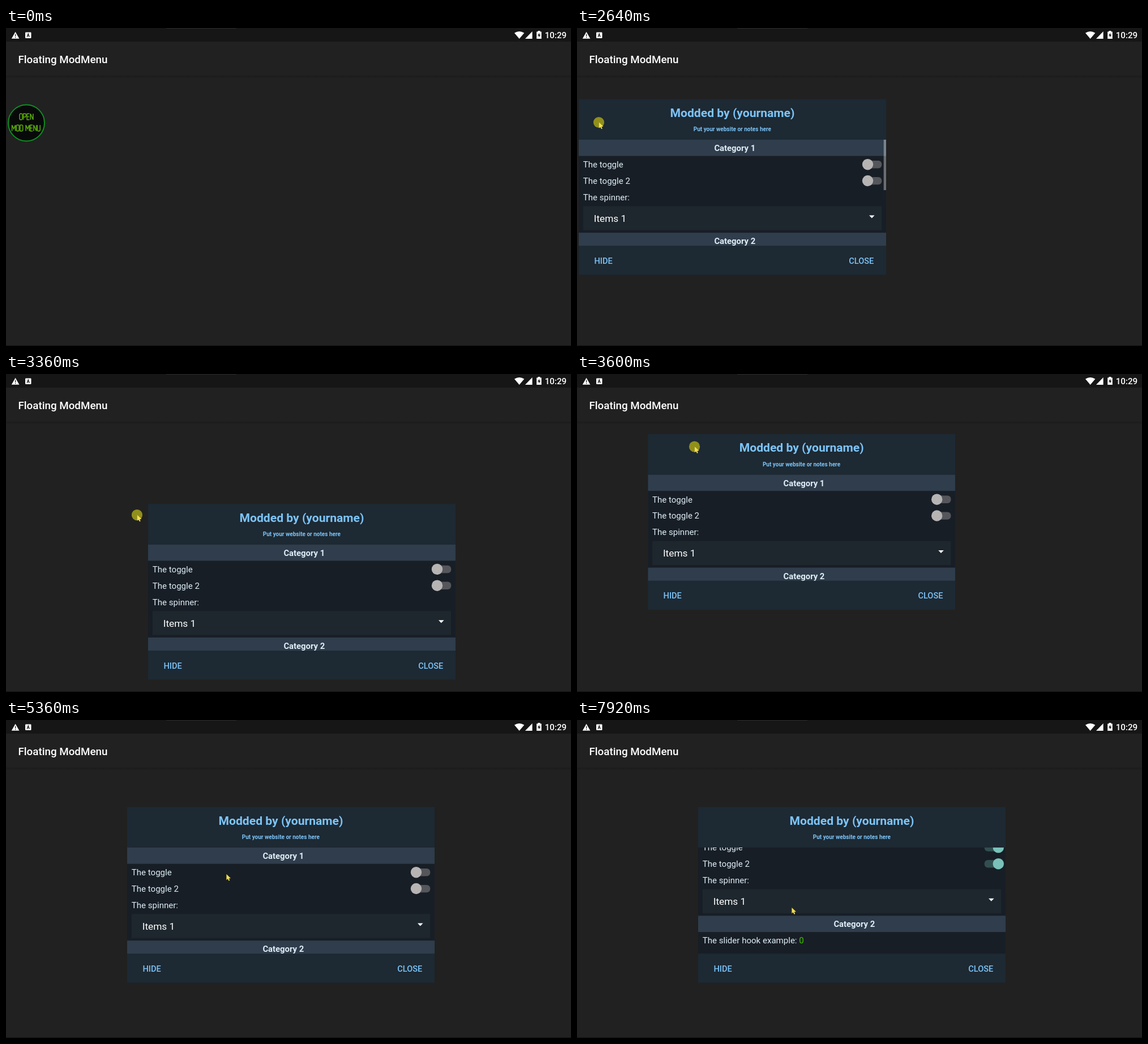
Write an HTML page that moves like this. It is 998 px wide and 561 px high and loops after 8000 ms.

```html
<!DOCTYPE html>
<html lang="en">
<head>
<meta charset="utf-8">
<title>Floating ModMenu</title>
<style>
html, body { margin: 0; width: 100%; height: 100%; overflow: hidden; background: #212121; }
svg { display: block; width: 998px; height: 561px; font: 15.05px Roboto, sans-serif; fill: #deedf6; }
.bold { font-weight: 700; }
.mid { text-anchor: middle; }
.medium { font-weight: 500; }
.category { font-size: 14.85px; }
.button { font-size: 14.6px; }
.accent { fill: #7cc4f8; }
.white { fill: #fff; }
</style>
</head>
<body>
<svg viewBox="0 0 998 561">
  <defs>
    <clipPath id="view"><rect y="71.5" width="543" height="187.2"/></clipPath>
    <linearGradient id="shade" x2="0" y2="1">
      <stop stop-color="#1b1b1b"/><stop offset="1" stop-color="#212121"/>
    </linearGradient>
    <g id="track"><rect x="505.7" y="-6.6" width="29.6" height="13.4" rx="6"/></g>
  </defs>

  <rect width="998" height="561" fill="#212121"/>
  <rect y="84" width="998" height="5" fill="url(#shade)"/>
  <rect width="998" height="24" fill="#161616"/>
  <rect x="283" width="124" height="1" fill="#2b2b2b"/>
  <rect y="560" width="998" height="1" fill="#111"/>
  <text class="medium white" x="21.4" y="61.8" font-size="18.8">Floating ModMenu</text>

  <g class="white">
    <path d="M16.6 6.8L23.4 18.7H9.8Z"/>
    <path d="M16.6 11V14.6M16.6 15.8V17.2" stroke="#161616" stroke-width="1.3"/>
    <rect x="34" y="7.5" width="10.5" height="10.5" rx="1.2"/>
    <path d="M37.2 15.8L39.25 10L41.3 15.8M38 14H40.5" fill="none" stroke="#161616" stroke-width="1.2"/>
    <path d="M906.7 19L898 8.8Q906.7 3.2 915.4 8.8Z"/>
    <path d="M929.6 6V19H917Z"/>
    <path d="M939.5 6.4V5H943.5V6.4H945.8V19H937.2V6.4Z"/>
    <path d="M942.2 8.5L939 13.4H941.1V16.8L944.2 11.8H942.2Z" fill="#161616"/>
    <text class="medium" x="951.7" y="18.2" font-size="15.2">10:29</text>
  </g>

  <g id="badge">
    <circle cx="36" cy="167.5" r="32" fill="#080a0a" stroke="#0d9020" stroke-width="2"/>
    <g id="letters" fill="none" stroke="#5aac0c" stroke-width="1.6" role="img" aria-label="OPEN MOD MENU"></g>
  </g>

  <g id="panel">
    <rect width="543" height="310" fill="#1d2933"/>
    <text class="bold accent mid" x="271.5" y="31.3" font-size="21.1">Modded by (yourname)</text>
    <text class="bold accent mid" x="271.3" y="56.8" font-size="10">Put your website or notes here</text>
    <g clip-path="url(#view)">
      <rect y="71.5" width="543" height="188" fill="#181e26"/>
      <g id="content">
        <rect y="71.5" width="543" height="28.7" fill="#2f3d4c"/>
        <text class="bold mid category" x="275.8" y="91.9">Category 1</text>
        <text x="7.8" y="120.7">The toggle</text>
        <text x="7.8" y="149.5">The toggle 2</text>
        <text x="7.8" y="178.3">The spinner:</text>
        <g class="switch" transform="translate(0 115.2)"><use href="#track"/><circle r="9.7"/></g>
        <g class="switch" transform="translate(0 144)"><use href="#track"/><circle r="9.7"/></g>
        <rect x="8" y="188.8" width="527" height="42.4" fill="#1e272e"/>
        <text class="white" x="26.7" y="216.5" font-size="17.3">Items 1</text>
        <path class="white" d="M513 205H522.6L517.8 210Z"/>
        <rect y="235.6" width="543" height="28.7" fill="#2f3d4c"/>
        <text class="bold mid category" x="275.8" y="255.8">Category 2</text>
        <text x="7.8" y="284.8">The slider hook example: <tspan fill="#41c300">0</tspan></text>
      </g>
      <rect id="bar" x="538.7" width="4.3" height="89" fill="#fff"/>
    </g>
    <text class="medium accent button" x="27.4" y="290.5">HIDE</text>
    <text class="medium accent button" x="477.2" y="290.5">CLOSE</text>
  </g>

  <g id="cursor">
    <circle id="press" r="9.6" fill="#918f1c"/>
    <path d="M.4 0V10.2L2.8 8.2L4.5 11.8L6.3 10.9L4.7 7.5L8 7.2Z" fill="#f3de55"/>
  </g>
</svg>

<script>
const $ = id => document.getElementById(id);
const clamp = v => Math.max(0, Math.min(1, v));
const switches = document.querySelectorAll('.switch');

// Angular badge lettering: width and strokes of each letter
const glyphs = {
  O: [5, 'M0 1.5L1 0H4L5 1.5V9.5L4 11H1L0 9.5Z'],
  P: [5, 'M0 11V0H4L5 1.5V4.5L4 6H0'],
  E: [4.5, 'M4.5 0H0V11H4.5M0 5.5H4'],
  N: [5, 'M0 11V0L5 11V0'],
  M: [6.4, 'M0 11V0L3.2 7L6.4 0V11'],
  D: [5, 'M0 0H3.8L5 1.5V9.5L3.8 11H0Z'],
  U: [5, 'M0 0V9.5L1 11H4L5 9.5V0'],
  ' ': [2, '']
};
function letter(text, x, y) {
  for (const c of text) {
    const [w, d] = glyphs[c];
    $('letters').innerHTML += `<path d="${d}" transform="translate(${x} ${y}) scale(.95)"/>`;
    x += w * .95 + 1.75;
  }
}
letter('OPEN', 24.1, 151.2);
letter('MOD MENU', 10.6, 171.2);

// Turning points as [time, position], eased in between
const panelX = [[2690, 3], [3160, 401], [3560, 101], [3650, 172], [3850, 256], [4120, 243], [4280, 214]];
const panelY = [[2690, 125.5], [2860, 118], [3270, 247], [3720, 76], [4140, 162], [4280, 153.5]];
const mouseX = [[120, 889], [920, 51], [1200, 38], [4280, 250], [5000, 384], [5360, 389], [7320, 389], [7920, 379]];
const mouseY = [[120, 537], [800, 147], [920, 187], [1200, 166], [4280, 194.5], [4780, 304], [5200, 272],
  [5920, 272], [6080, 297], [6400, 297], [6600, 310], [6770, 310], [6960, 266], [7160, 266],
  [7320, 258.7], [7920, 331]];
const presses = [[1600, 1680], [2640, 4280], [5800, 5880], [6280, 6360], [6600, 7320]];

// Smooth interpolation that never overshoots its keys
function at(keys, t) {
  const last = keys.length - 1;
  if (t <= keys[0][0]) return keys[0][1];
  if (t >= keys[last][0]) return keys[last][1];
  const i = keys.findIndex(key => key[0] > t) - 1;
  const secant = j => (keys[j + 1][1] - keys[j][1]) / (keys[j + 1][0] - keys[j][0]);
  const slope = j => {
    if (j === 0 || j === last) return 0;
    const a = secant(j - 1), b = secant(j);
    return a * b <= 0 ? 0 : 2 * a * b / (a + b);
  };
  const h = keys[i + 1][0] - keys[i][0], u = (t - keys[i][0]) / h, v = 1 - u;
  return v * v * (1 + 2 * u) * keys[i][1] + u * u * (3 - 2 * u) * keys[i + 1][1]
    + h * u * v * (v * slope(i) - u * slope(i + 1));
}

// The pointer rests until the drag, then leads the panel by 50 ms
function mouse(t) {
  if (t >= 2640 && t < 4280) return [at(panelX, t + 50) + 35.5, at(panelY, t + 50) + 41];
  const s = t < 2640 ? Math.min(t, 1200) : t;
  return [at(mouseX, s), at(mouseY, s)];
}

const move = (el, x, y) => el.setAttribute('transform', `translate(${x} ${y})`);
const show = (el, on) => el.style.display = on ? '' : 'none';

function draw(t) {
  show($('badge'), t < 1800);
  show($('panel'), t >= 1800);
  move($('panel'), at(panelX, t), at(panelY, t));

  // The list follows the pointer while it is held
  const scroll = t < 6600 ? 0 : Math.max(0, 302.5 - at(mouseY, Math.min(t, 7320)));
  move($('content'), 0, -scroll);
  $('bar').setAttribute('y', 71.5 + scroll * .476);
  $('bar').setAttribute('opacity', .36 * (1 - clamp((t - (scroll ? 7600 : 3000)) / 250)));

  switches.forEach((s, i) => {
    const on = clamp((t - 5840 - 480 * i) / 200);
    const [track, thumb] = s.children;
    track.setAttribute('fill', on ? '#314f50' : '#55565b');
    thumb.setAttribute('fill', on ? '#79c2ba' : '#b7b4b4');
    thumb.setAttribute('cx', 510.5 + 19.8 * on);
  });

  move($('cursor'), ...mouse(t));
  show($('cursor'), t >= 120);
  show($('press'), presses.some(([a, b]) => t >= a && t < b));
}

function tick() {
  draw(Math.floor(performance.now() % 8000 / 40) * 40);
  requestAnimationFrame(tick);
}
tick();
</script>
</body>
</html>
```
